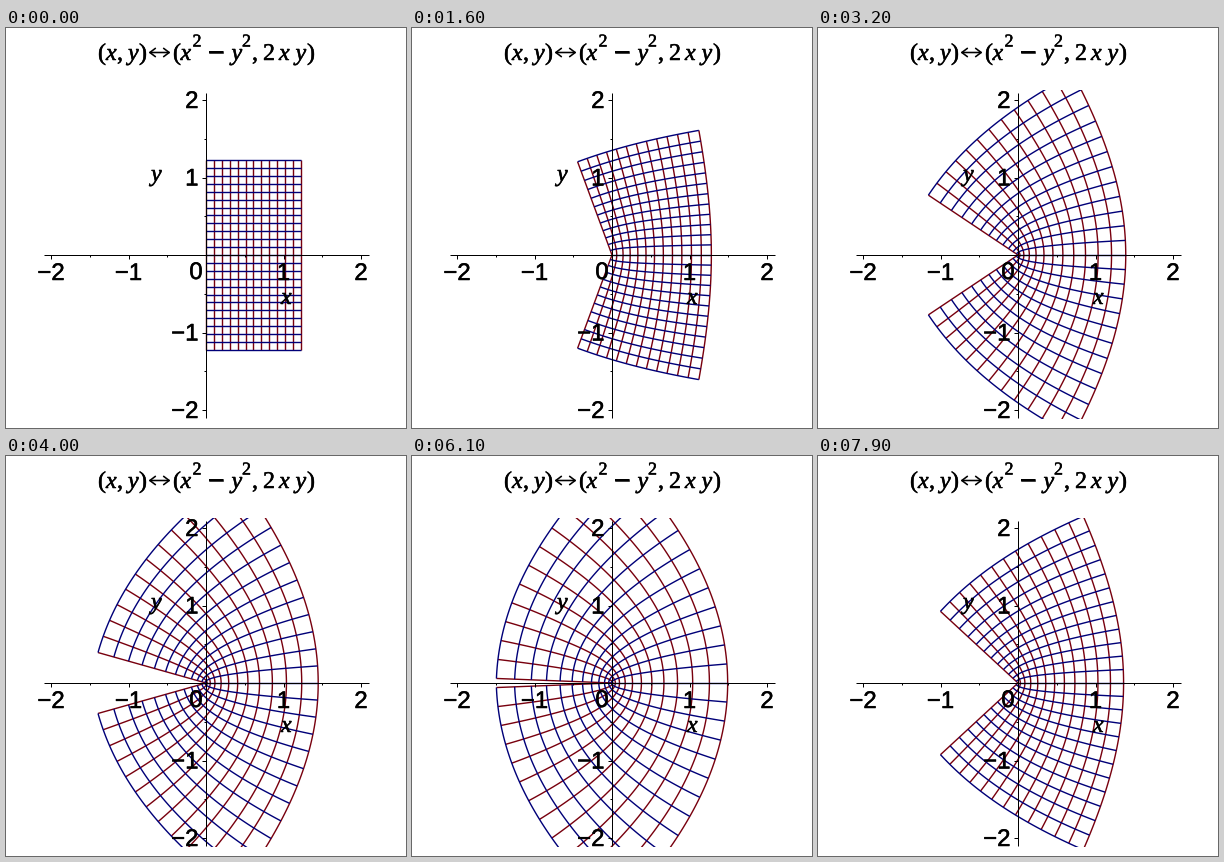
These frames come from a looping animation (400x400 px, 8000 ms). A matplotlib script:

```python
import numpy as np
import matplotlib.pyplot as plt
from matplotlib.animation import FuncAnimation
from matplotlib.collections import LineCollection
from matplotlib.patches import Rectangle
from matplotlib.patheffects import withStroke

FRAMES, STEP_MS = 80, 100
OX, OY, UNIT = 200, 227, 77.5   # origin and pixels per unit
SIDE = np.sqrt(1.5)
COLS, ROWS = 12, 24
RED, BLUE = "#78000e", "#000078"
SANS, SERIF = "Liberation Sans", "Liberation Serif"

fig = plt.figure(figsize=(4, 4), dpi=100, facecolor="white")
ax = fig.add_axes([0, 0, 1, 1])
ax.set_xlim(0, 400)
ax.set_ylim(400, 0)
ax.axis("off")


def px(pixels):
    """Pixels to points."""
    return pixels * 0.72


def text(x, y, s, size=24, family=SERIF, **kw):
    bold = [withStroke(linewidth=px(0.5), foreground="black")]
    ax.text(x, y, s, fontsize=px(size), family=family, zorder=5,
            path_effects=bold, **kw)


def line(x0, y0, x1, y1):
    ax.plot([x0, x1], [y0, y1], color="black", lw=px(1), zorder=4,
            solid_capstyle="butt")


def draw_axes():
    line(38, OY, 363, OY)
    line(OX, 65, OX, 390)
    for k in (-4, -3, -2, -1, 1, 2, 3, 4):
        size = 2 if k % 2 else 4
        x, y = OX + k / 2 * UNIT, OY - k / 2 * UNIT
        line(x, OY, x, OY + size)
        line(OX - size, y, OX, y)
    for k in (-2, -1, 1, 2):
        label = str(k).replace("-", "\u2212")
        text(OX + k * UNIT, 252, label, family=SANS, ha="center")
        text(192.5, OY - k * UNIT + 8, label, family=SANS, ha="right")
    text(190, 251, "0", family=SANS, ha="center")
    text(275, 276, "x", style="italic")
    text(145, 153, "y", style="italic")


def draw_title():
    base = 32
    for x, s in ((92, "("), (111, ","), (133, ")"), (167, "("), (246, ","),
                 (257, "2"), (301, ")")):
        text(x, base, s)
    for x, s in ((100, "x"), (122, "y"), (174.5, "x"), (225.5, "y"),
                 (273, "x"), (289.5, "y")):
        text(x, base, s, style="italic")
    for x in (186.5, 236):
        text(x, base - 13.5, "2", size=18)
    text(201.5, base + 2, "\u2212", size=30)
    ax.annotate("", (164.5, 24.5), (142.5, 24.5), arrowprops=dict(
        arrowstyle="<->,head_length=0.4,head_width=0.3", mutation_scale=10,
        shrinkA=0, shrinkB=0, lw=px(1.6)))


def grid_lines():
    u = np.linspace(0, SIDE, COLS + 1)
    v = np.linspace(-SIDE, SIDE, ROWS + 1)
    us = np.linspace(0, SIDE, 61)
    vs = np.linspace(-SIDE, SIDE, 121)
    return u[:, None] + 1j * vs, us + 1j * v[:, None]


def warp(z, p):
    w = np.abs(z) ** p * np.exp(1j * p * np.angle(z))
    return np.stack([OX + UNIT * w.real, OY - UNIT * w.imag], axis=-1)


def power(i):
    """Exponent rises from 1 to 2, rests, then falls again."""
    if i < 60:
        return 1 + np.clip(i - 7, 0, 40) / 40
    return 2 - (i - 60) / 40


draw_axes()
draw_title()
window = Rectangle((0, 62), 400, 329, transform=ax.transData)
families = []
for z, color, order in zip(grid_lines(), (RED, BLUE), (2, 3)):
    lines = LineCollection([], colors=color, linewidths=px(1.4), zorder=order)
    ax.add_collection(lines, autolim=False)
    lines.set_clip_path(window)
    families.append((z, lines))


def update(i):
    p = power(i)
    for z, lines in families:
        lines.set_segments(warp(z, p))
    return [lines for _, lines in families]


anim = FuncAnimation(fig, update, frames=FRAMES, interval=STEP_MS,
                     repeat=True, repeat_delay=0, blit=False)
plt.show()
```
